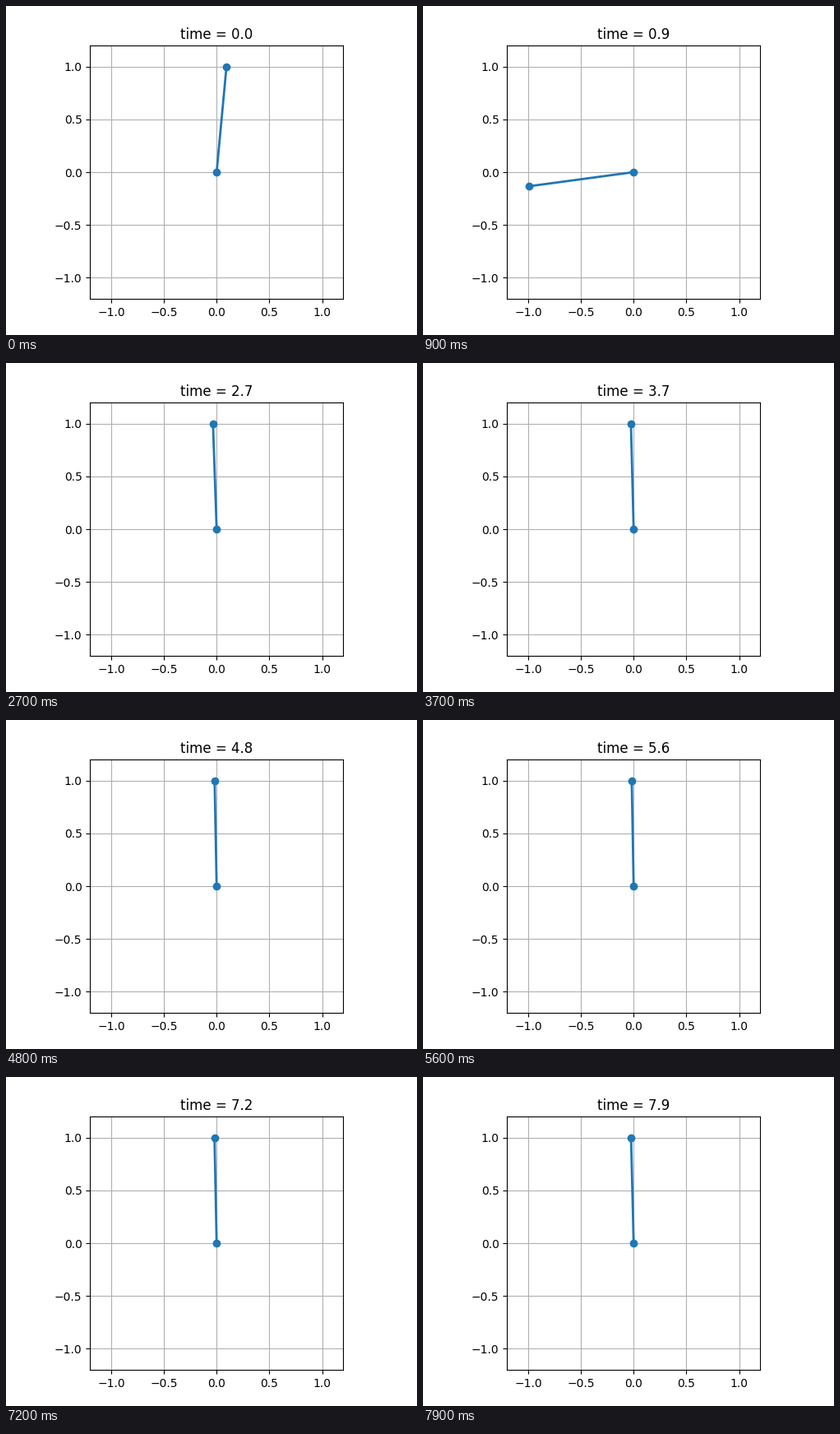
These frames come from a looping animation (500x400 px, 8 s). A matplotlib script:

```python
import numpy as np
import matplotlib.pyplot as plt
from matplotlib.animation import FuncAnimation

G = 9.8
START_ANGLE, START_SPEED = 0.093, 2.623
CATCH = 1.1           # moment the controller takes over from free swing
REST = -0.0245        # angle it settles around
STEP = 0.001
FRAMES, INTERVAL = 80, 100


def swing(t):
    """Free swing around the pivot: angle from upright and its rate."""
    angle, speed = START_ANGLE, START_SPEED
    for _ in range(round(t / STEP)):
        speed += 0.5 * STEP * G * np.sin(angle)
        angle += STEP * speed
        speed += 0.5 * STEP * G * np.sin(angle)
    return angle, speed


catch_angle, catch_speed = swing(CATCH)
# Overdamped approach: a slow and a fast mode, matched to the swing.
SLOW_AMP, SLOW_RATE = 0.25, 2.0
FAST_AMP = REST - (catch_angle - 2 * np.pi) - SLOW_AMP
FAST_RATE = (catch_speed - SLOW_AMP * SLOW_RATE) / FAST_AMP


def tremble(t):
    if t < 1.85:
        return 0.0
    amp = 0.004 + 0.0025 * np.exp(-((t - 5.5) / 0.8) ** 2)
    return amp * np.cos(2 * np.pi * (t - 4.8) / 0.4)


def angle_at(t):
    if t <= CATCH:
        return swing(t)[0]
    s = t - CATCH
    lag = SLOW_AMP * np.exp(-SLOW_RATE * s) + FAST_AMP * np.exp(-FAST_RATE * s)
    return REST - lag + tremble(t)


fig, ax = plt.subplots(figsize=(5, 4), dpi=100)
ax.set_xlim(-1.2, 1.2)
ax.set_ylim(-1.2, 1.2)
ax.set_aspect("equal")
ax.grid(True)
rod, = ax.plot([], [], "o-", lw=2)
title = ax.set_title("time = 0.0")


def update(i):
    t = i * INTERVAL / 1000
    a = angle_at(t)
    rod.set_data([0, np.sin(a)], [0, np.cos(a)])
    title.set_text(f"time = {t:.1f}")
    return rod, title


anim = FuncAnimation(fig, update, frames=FRAMES, interval=INTERVAL,
                     repeat=True, repeat_delay=0, blit=False)
plt.show()
```
